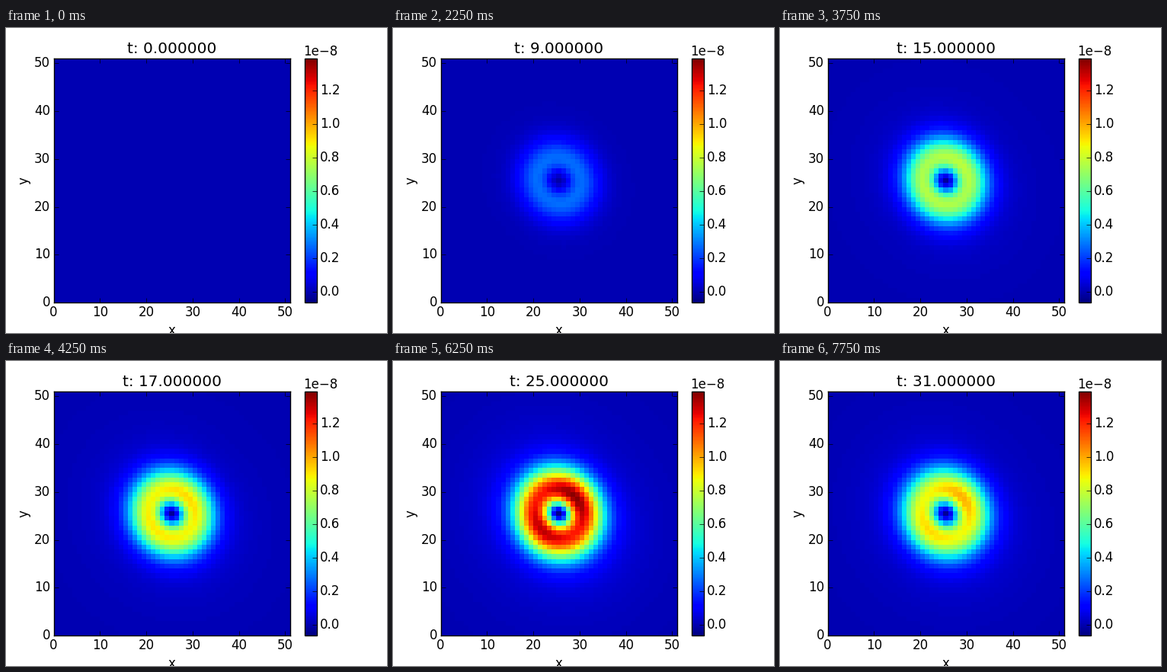
A matplotlib script that plays this animation: 500 by 400 pixels, repeating every 8000 ms.

```python
import numpy as np
import matplotlib.pyplot as plt
from matplotlib.animation import FuncAnimation

plt.style.use("classic")

N = 51          # cells per side
FRAMES = 32
STEP_MS = 250

# Peak height of the ring (in 1e-8) over time
PEAK_T = [0, 3, 5, 7, 9, 13, 17, 21, 23, 25, 28, 31]
PEAK = [0, 0.01, 0.05, 0.14, 0.27, 0.61, 0.87, 1.21, 1.27, 1.24, 1.07, 0.88]

edges = np.arange(N + 1)
cells = np.arange(N) - N // 2
X, Y = np.meshgrid(cells, cells)
R = np.hypot(X, Y)
TILT = np.arctan2(Y, X) - np.pi / 4

# Wide faint glow around the ring and a small dip in its centre
HALO = (0.35 * np.exp(-R / 7) * (1 - np.exp(-(R / 7) ** 4))
        * (1 - 0.2 * np.cos(2 * TILT) - 0.1 * np.cos(TILT)))
DIP = 0.035 * np.exp(-R**2 / 2)


def field(t):
    """Ring with a hollow centre, brighter along the rising diagonal."""
    ring = np.interp(t, [9, 21], [4.65, 4.95])
    s = R / (ring * (1 - 0.03 * np.cos(2 * TILT)))
    power = 1.65
    profile = s**2 * np.exp(2 / power * (1 - s**power))
    lobes = np.interp(t, [9, 25], [0, 0.06])
    skew = np.interp(t, [9, 31], [0, 0.04])
    shade = 1 + lobes * np.cos(2 * TILT) + skew * np.cos(TILT)
    glow = np.interp(t, [5, 21], [0.2, 1])
    return np.interp(t, PEAK_T, PEAK) * (profile * shade + glow * HALO - DIP)


fig, ax = plt.subplots(figsize=(5, 4), dpi=100, facecolor="white")
mesh = ax.pcolormesh(edges, edges, field(0), cmap="jet",
                     vmin=-0.0636, vmax=1.391)
ax.set_xlim(0, N)
ax.set_ylim(0, N)
ax.tick_params(pad=3.2)
ax.set_xlabel("x", labelpad=4.2)
ax.set_ylabel("y", labelpad=3)
title = ax.set_title("t: 0.000000")

bar = fig.colorbar(mesh, ax=ax, ticks=np.arange(0, 1.3, 0.2), format="%.1f")
bar.ax.tick_params(pad=3)
fig.text(390 / 500, 1 - 36 / 400, "1e\u22128", ha="left", va="baseline")


def draw(t):
    mesh.set_array(field(t))
    title.set_text(f"t: {t:.6f}")
    return mesh, title


anim = FuncAnimation(fig, draw, frames=FRAMES, interval=STEP_MS,
                     repeat=True, blit=False)
plt.show()
```
